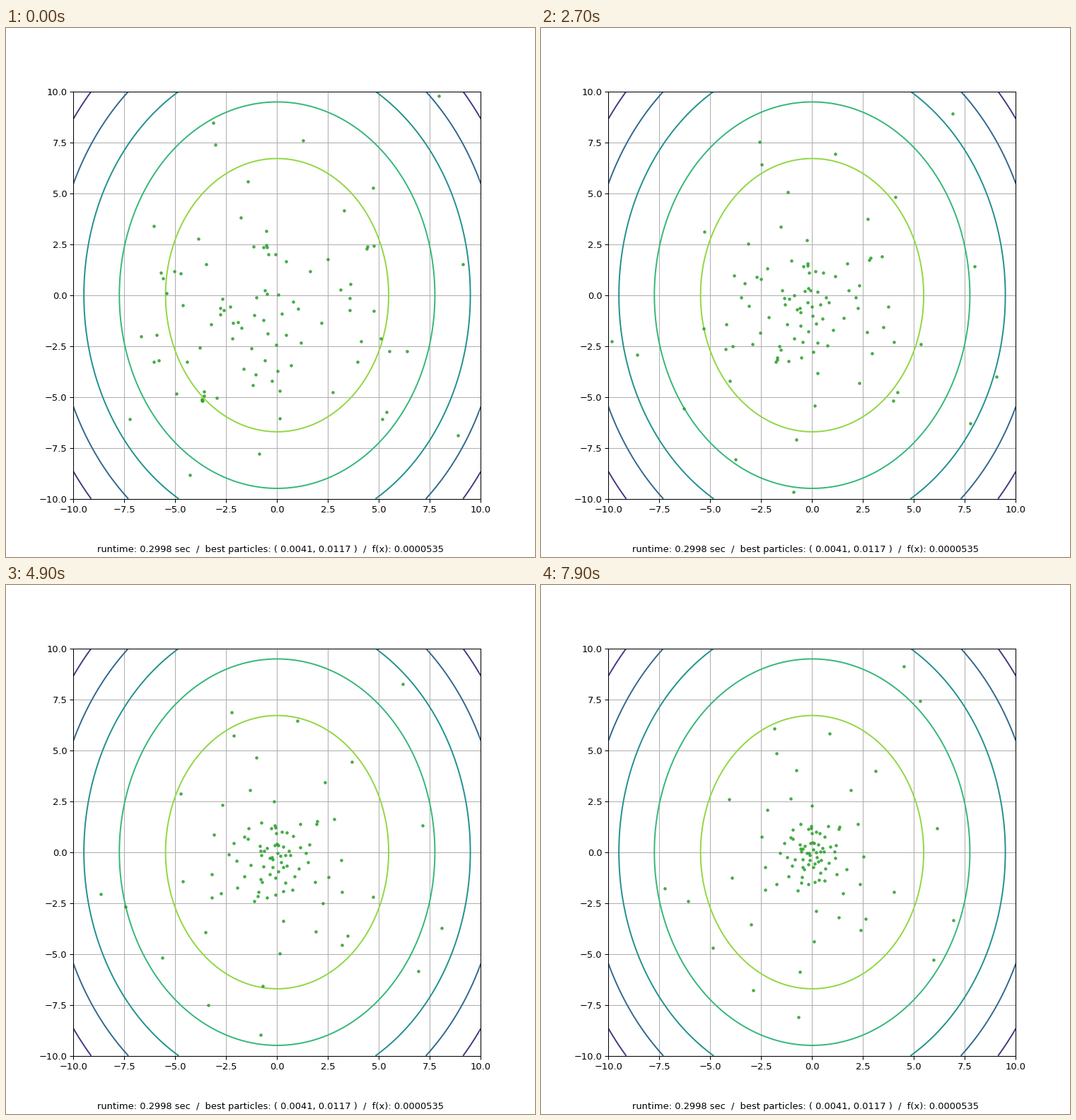
These frames come from a looping animation (748 by 748 pixels, 8000 ms). A matplotlib script:

```python
import numpy as np
import matplotlib.pyplot as plt
from matplotlib.animation import FuncAnimation

FRAMES, INTERVAL = 80, 100
COUNT = 100
STEP, WIDTH, PUSH = 0.005, 1.3, 0.8   # step size, kernel width, repulsion
SLOPE = np.array([1, 2 / 3])          # gradient of x^2/2 + y^2/3

# Lone outer particles; the last five drift in from outside the axes
outer = [(7.93, 9.78), (-3.13, 8.45), (1.28, 7.6), (-7.23, -6.1),
         (-4.3, -8.83), (8.88, -6.88), (9.13, 1.53),
         (-10.15, -3.23), (-11.5, -2.55), (-1.03, -10.56),
         (10.35, -4.4), (6.8, 11.93)]


def scatter_start(seed=7):
    """Outer particles, one tight clump and a wide normal cloud."""
    rng = np.random.default_rng(seed)
    clump = rng.normal((-3.6, -5), 0.2, (5, 2))
    cloud = rng.normal((-0.4, -0.2), (4.1, 3.8), (3 * COUNT, 2))
    cloud = cloud[np.hypot(*cloud.T) < 8]
    return np.vstack([outer, clump, cloud])[:COUNT]


def move(p):
    """One step of kernel-smoothed descent with mutual repulsion."""
    gap = p[:, None] - p[None]
    k = np.exp(-(gap ** 2).sum(axis=2) / WIDTH)
    pull = k @ (p * SLOPE)
    push = PUSH * (k[..., None] * gap).sum(axis=1)
    return p + STEP * (push - pull)


path = [scatter_start()]
for _ in range(FRAMES - 1):
    path.append(move(path[-1]))

fig, ax = plt.subplots(figsize=(8, 8), dpi=93.5)
ax.set_aspect("equal")
ax.set(xlim=(-10, 10), ylim=(-10, 10))
ax.grid(True)

x, y = np.meshgrid(np.linspace(-10, 10, 200), np.linspace(-10, 10, 200))
ax.contour(x, y, -(x ** 2 / 2 + y ** 2 / 3), levels=np.arange(-75, 0, 15),
           cmap="viridis", vmin=-90, vmax=0)
fig.text(0.5, 0.01, "runtime: 0.2998 sec  /  best particles: "
         "( 0.0041, 0.0117 )  /  f(x): 0.0000535", ha="center")

dots, = ax.plot([], [], "o", color="tab:green", ms=3.5, mew=0, alpha=0.88, zorder=2.2)


def draw(i):
    dots.set_data(path[i][:, 0], path[i][:, 1])
    return dots,


anim = FuncAnimation(fig, draw, frames=FRAMES, interval=INTERVAL, repeat=True)
plt.show()
```
